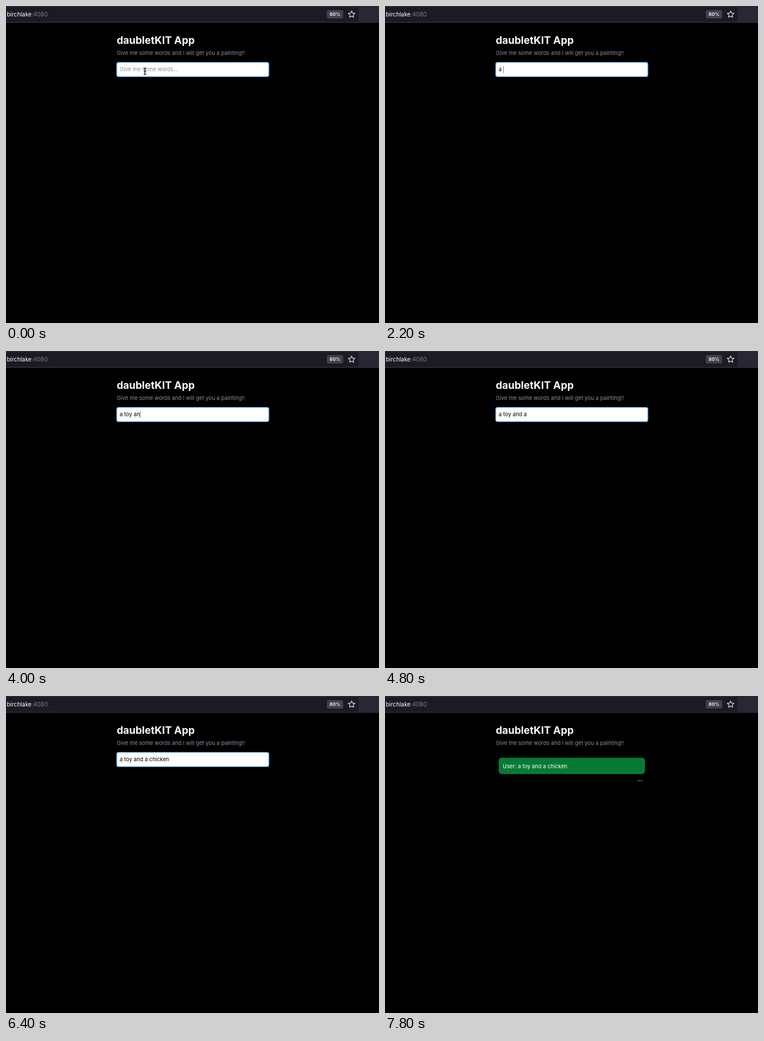
These frames come from a looping animation (640 by 544 pixels, 8000 ms). An HTML page:

```html
<!DOCTYPE html>
<html lang="en">
<head>
<meta charset="utf-8">
<title>Words to painting</title>
<style>
  html, body { margin: 0; width: 100%; height: 100%; overflow: hidden; background: #000; }
  svg { display: block; width: 100%; height: 100%; }
  text { font: 9.3px Inter, "Open Sans", sans-serif; white-space: pre; }
  .title { font-size: 17.6px; font-weight: 700; fill: #fff; }
  .sub { fill: #8e8ea0; }
  .url { font-size: 9.9px; fill: #fbfbfe; }
  .port { fill: #7c7b88; }
  .zoom { font-size: 8px; font-weight: 600; fill: #fbfbfe; text-anchor: middle; }
  .hint { fill: #8e8e9a; }
  .dots { text-anchor: end; font-weight: 700; fill: #e0e0e8; }
</style>
</head>
<body>
<svg viewBox="0 0 640 544">
  <rect width="640" height="544" fill="#000"/>

  <!-- browser bar -->
  <rect width="640" height="29" fill="#282734"/>
  <rect x="-6" y="2" width="611" height="25" rx="3" fill="#1c1b24"/>
  <text class="url" x="1.5" y="18">birchlake<tspan class="port">:4080</tspan></text>
  <rect x="550.5" y="7" width="28" height="14.5" rx="3" fill="#42414d"/>
  <text class="zoom" x="564.5" y="17.3">80%</text>
  <path id="star" fill="none" stroke="#e4e4ea" stroke-width="1.1" stroke-linejoin="round"/>

  <text class="title" x="190" y="65">daubletKIT App</text>
  <text class="sub" x="190" y="84">Give me some words and I will get you a painting!!</text>

  <g id="form">
    <rect x="189.2" y="96" width="262.6" height="26" rx="4" fill="#3f8fd4"/>
    <rect x="190.5" y="97.3" width="260" height="23.4" rx="2.8" fill="#fff"/>
    <text class="hint" id="hint" x="195" y="112.4">Give me some words...</text>
    <path id="beam" d="M236.2 106.3q2.2 0 2.2 1.6v8q0 1.6-2.2 1.6M240.6 106.3q-2.2 0-2.2 1.6M240.6 117.5q-2.2 0-2.2-1.6M237 112.6h2.8"
          fill="none" stroke="#000" stroke-width="1.1"/>
    <text id="typed" x="195" y="112.4" xml:space="preserve"></text>
    <rect id="caret" y="103.5" width="1" height="11.5" fill="#777"/>
  </g>

  <g id="reply">
    <rect x="195" y="106" width="251" height="28" rx="5" fill="#047a34"/>
    <text x="202" y="123.5" fill="#fff">User: a toy and a chicken</text>
    <text class="dots" id="dots" x="442" y="146">...</text>
  </g>
</svg>
<script>
  const LOOP = 8000, SENT = 6600;
  const PHRASE = "a toy and a chicken";
  // [time, letters typed]
  const KEYS = [
    [800, 1], [1000, 2], [2800, 3], [3000, 4], [3200, 5], [3600, 6],
    [3800, 7], [4000, 8], [4200, 9], [4400, 10], [4600, 11], [5000, 12],
    [5200, 13], [5400, 14], [5600, 16], [5800, 17], [6200, 19]
  ];
  const CARET_OFF = [[0, 800], [1800, 2200], [4800, 5000], [6400, SENT]];

  const el = id => document.getElementById(id);
  const [form, hint, beam, typed, caret, reply, dots] =
    ["form", "hint", "beam", "typed", "caret", "reply", "dots"].map(el);
  const show = (node, on) => node.setAttribute("visibility", on ? "inherit" : "hidden");

  const starPoints = Array.from({ length: 10 }, (_, i) => {
    const r = i % 2 ? 2.9 : 6, a = i * Math.PI / 5;
    return (593 + r * Math.sin(a)).toFixed(2) + " " + (14.5 - r * Math.cos(a)).toFixed(2);
  });
  el("star").setAttribute("d", "M" + starPoints.join("L") + "Z");

  function lettersAt(t) {
    let n = 0;
    for (const [time, count] of KEYS) if (t >= time) n = count;
    return n;
  }

  function draw(t) {
    const text = PHRASE.slice(0, lettersAt(t));
    const sent = t >= SENT;
    if (typed.textContent !== text) typed.textContent = text;
    show(form, !sent);
    show(reply, sent);
    show(hint, !text);
    show(beam, !text);
    show(caret, !CARET_OFF.some(([from, to]) => t >= from && t < to));
    caret.setAttribute("x", 195 + (text ? typed.getComputedTextLength() : 0));
    dots.setAttribute("y", t < SENT + 200 ? 145.8 : 146.4);
  }

  const start = performance.now();
  function tick(now) {
    draw(Math.max(0, now - start) % LOOP);
    requestAnimationFrame(tick);
  }
  draw(0);
  requestAnimationFrame(tick);
</script>
</body>
</html>
```
